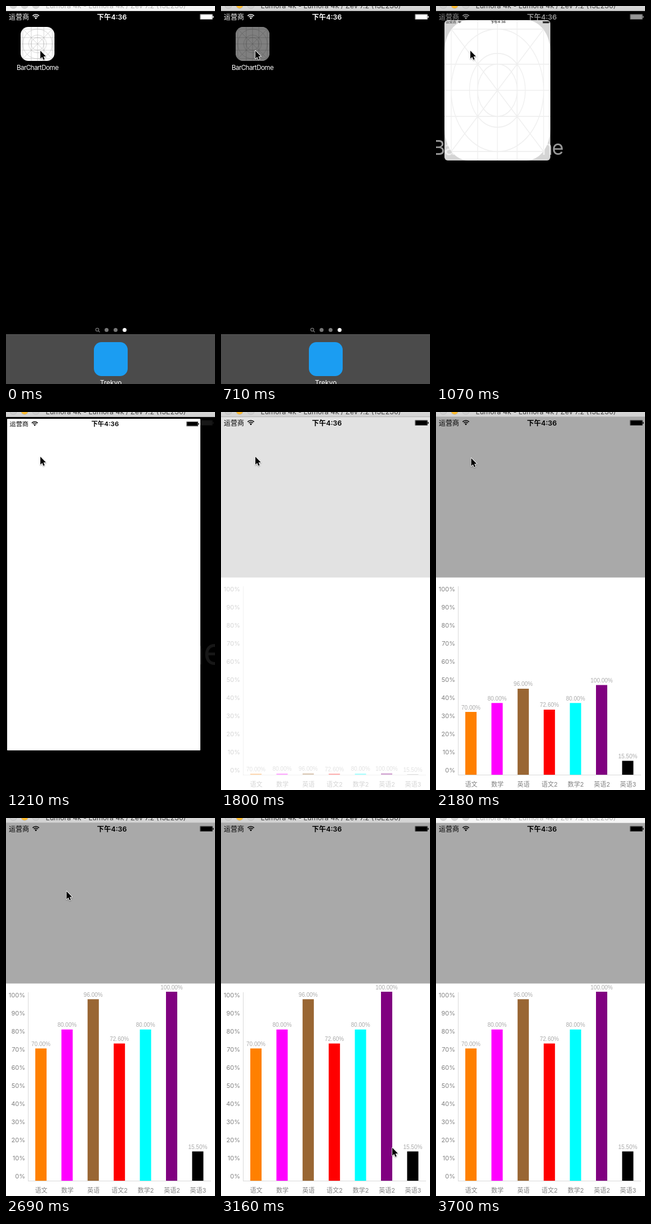
Write an HTML page with a canvas that moves like this. It is 371 px wide and 668 px high and loops after 3730 ms.

```html
<!DOCTYPE html>
<html lang="zh">
<head>
<meta charset="utf-8">
<style>
html, body { margin: 0; width: 371px; height: 668px; overflow: hidden; background: #000; }
canvas { display: block; }
</style>
</head>
<body>
<canvas id="stage" width="371" height="668"></canvas>
<script>
const W = 371, H = 668, LOOP = 3730;
const c = document.getElementById('stage').getContext('2d');
const UI = 'Inter, "Noto Sans CJK SC", "Noto Sans CJK", sans-serif';
const ARIAL = '"Liberation Sans", Arial, sans-serif';

const bars = [
  ['语文', 70, '#ff8000'], ['数学', 80, '#f0f'], ['英语', 96, '#996633'],
  ['语文2', 72.6, '#f00'], ['数学2', 80, '#0ff'], ['英语2', 100, '#800080'],
  ['英语3', 15.5, '#000']
];
const ticks = [0, 600, 710, 950, 1010, 1070, 1160, 1210, 1300, 1390, 1480,
  1800, 1850, 1930, 2010, 2100, 2180, 2230, 2290,
  2350, 2400, 2450, 2500, 2550, 2600, 2650, 2690, 2750, 2800, 2860];
for (let i = 0; i < 18; i++) ticks.push(2890 + i * 490 / 17);
ticks.push(3700);

// Pointer path: time, x, y
const path = [[2100, 61, 79], [2180, 62.5, 81.5], [2350, 62.5, 82],
  [2690, 107.5, 129.5], [2860, 244, 473], [3380, 352, 670]];

const clamp = v => Math.max(0, Math.min(1, v));
const smooth = v => { v = clamp(v); return v * v * (3 - 2 * v); };

function text(s, x, y, font, color, align = 'center', spacing = 0) {
  c.font = font;
  c.fillStyle = color;
  c.textAlign = align;
  c.letterSpacing = spacing + 'px';
  c.fillText(s, x, y);
}

function rect(x, y, w, h, color, r = 0) {
  c.fillStyle = color;
  c.beginPath();
  c.roundRect(x, y, w, h, r);
  c.fill();
}

function disc(x, y, r, color) {
  c.fillStyle = color;
  c.beginPath();
  c.arc(x, y, r, 0, 7);
  c.fill();
}

function layer(alpha, draw) {
  c.save();
  c.globalAlpha *= alpha;
  draw();
  c.restore();
}

function statusBar(color) {
  text('运营商', 5, 23.5, '12px ' + UI, color, 'left');
  text('下午4:36', 188, 23.5, '600 12.4px ' + UI, color);
  c.strokeStyle = color;
  c.lineWidth = 1.7;
  for (const r of [8, 5]) {
    c.beginPath();
    c.arc(53, 23, r, -2.36, -0.78);
    c.stroke();
  }
  c.fillStyle = color;
  c.beginPath();
  c.moveTo(53, 23.5);
  c.arc(53, 23, 2.8, -2.36, -0.78);
  c.fill();
  c.lineWidth = 0.6;
  c.strokeRect(344.8, 14.8, 21.6, 8.8);
  rect(345.3, 15.3, 20.6, 7.8, color, 0.5);
  rect(367, 17.5, 1.5, 3.5, color, 0.7);
}

function line(x1, y1, x2, y2) {
  c.moveTo(x1, y1);
  c.lineTo(x2, y2);
}

// Template icon in a 60 x 60 box
function icon(shade) {
  c.save();
  rect(0, 0, 60, 60, '#fff', 13.5);
  c.clip();
  c.strokeStyle = '#a0a0a0';
  c.lineWidth = 0.42;
  c.beginPath();
  for (const f of [0.064, 0.314, 0.5, 0.686, 0.936]) {
    line(f * 60, 0, f * 60, 60);
    line(0, f * 60, 60, f * 60);
  }
  line(0, 0, 60, 60);
  line(60, 0, 0, 60);
  for (const r of [26.2, 15.8, 11.2]) {
    c.moveTo(30 + r, 30);
    c.arc(30, 30, r, 0, 7);
  }
  c.stroke();
  c.restore();
  if (shade) rect(0, 0, 60, 60, `rgba(0,0,0,${shade})`, 13.5);
}

function homeItems() {
  text('BarChartDome', 56, 113, '11.5px ' + UI, '#fff', 'center', -0.5);
  c.strokeStyle = '#777';
  c.lineWidth = 1.2;
  c.beginPath();
  c.arc(162, 572, 2.7, 0, 7);
  line(164, 574, 166.5, 576.5);
  c.stroke();
  disc(178.5, 572.5, 3.5, '#777');
  disc(194.5, 572.5, 3.5, '#777');
  disc(210.5, 572.5, 3.5, '#fff');
  rect(0, 580, W, 88, '#4b4b4b');
  rect(0, 580, W, 1, '#565656');
  rect(156, 594, 60, 60, '#1b9df2', 13.5);
  text('Trekvo', 186, 670, '12px ' + UI, '#fff');
}

function home(t) {
  const p = smooth((t - 905) / 374.6);
  const width = 60 + 311 * p;
  // Whole pixels keep the window edges sharp
  const [x, y, w, h] = [26 * (1 - p), 37 - 28 * p, width, width * (1 + 0.779 * p)].map(Math.round);
  const s = w / 60;
  layer(1 - p, () => {
    c.translate(x, y);
    c.scale(s, s);
    c.translate(-26, -37);
    homeItems();
  });
  layer(1 - p, () => statusBar('#fff'));
  layer(1, () => {
    c.translate(x, y);
    c.scale(s, h / 60);
    icon(t < 710 ? 0 : 0.5 * clamp(1 - p * 4));
  });
  layer(clamp(2.03 * p), () => {
    c.beginPath();
    c.roundRect(x, y, w, h, 10 * (1 - p));
    c.clip();
    c.translate(x, y);
    c.scale(w / W, h / 660);
    c.translate(0, -9);
    rect(0, 9, W, 660, '#fff');
    statusBar('#000');
  });
}

function chart(t) {
  const grow = smooth((t - 1755) / 880);
  for (let i = 0; i <= 10; i++)
    text(i * 10 + '%', 34, 637 - i * 32, '11px ' + UI, '#808080', 'right');
  rect(39, 308, 1, 334, '#d9d9d9');
  rect(39, 641, 325, 1, '#d9d9d9');
  bars.forEach(([name, value, color], i) => {
    const x = 52 + 46.4 * i, h = 3.34 * value * grow;
    rect(x, 641 - h, 20, h, color);
    text(value.toFixed(2) + '%', x + 10, 636.5 - h, '10px ' + ARIAL, '#aaa');
    text(name, x + 10.5, 662, '11px ' + UI, '#808080');
  });
}

function app(t) {
  rect(0, 9, W, 659, '#fff');
  if (t >= 1800) {
    layer(clamp(0.34 + (t - 1800) / 300), () => {
      rect(0, 9, W, 283.5, 'rgba(0,0,0,0.337)');
      chart(t);
    });
  }
  statusBar('#000');
}

function titleBar(active) {
  const g = c.createLinearGradient(0, 0, 0, 9);
  g.addColorStop(0, active ? '#d8d8d8' : '#f6f6f6');
  g.addColorStop(1, active ? '#d0d0d0' : '#f4f4f4');
  rect(0, 0, W, 9, g);
  rect(0, 8, W, 1, active ? '#b4b4b4' : '#dedede');
  [13, 33, 53].forEach((x, i) => {
    disc(x, -1.5, 6.5, active ? '#bcbcbc' : '#cacaca');
    disc(x, -1.5, 5.8, !active ? '#d4d4d4' : i === 1 ? '#fdbc30' : '#cecece');
  });
  text('Lumora 4k - Lumora 4k / Zev 7.2 (13E230)', 195, 3.5, '12.5px ' + UI,
    active ? '#404040' : '#b0b0b0');
}

function pointerAt(t) {
  let a = path[0];
  for (const b of path) {
    if (t < b[0]) {
      const f = b === a ? 0 : (t - a[0]) / (b[0] - a[0]);
      return [a[1] + (b[1] - a[1]) * f, a[2] + (b[2] - a[2]) * f];
    }
    a = b;
  }
  return [a[1], a[2]];
}

function pointer(t) {
  const [x, y] = pointerAt(t);
  layer(1, () => {
    c.translate(x, y);
    c.beginPath();
    c.moveTo(0, 0);
    for (const [px, py] of [[0, 14], [3.2, 11], [5.4, 16], [7.6, 15], [5.5, 10.3], [9.8, 10]])
      c.lineTo(px, py);
    c.closePath();
    c.shadowColor = 'rgba(0,0,0,0.35)';
    c.shadowBlur = 2;
    c.shadowOffsetY = 1;
    c.strokeStyle = '#fff';
    c.lineWidth = 1.8;
    c.lineJoin = 'round';
    c.stroke();
    c.shadowColor = 'transparent';
    c.fillStyle = '#000';
    c.fill();
  });
}

function draw(time) {
  const t = ticks.findLast(k => k <= time);
  rect(0, 0, W, H, '#000');
  if (t < 1390) home(t); else app(t);
  titleBar(t >= 600 && t < 3700);
  pointer(t);
}

let start;
function frame(now) {
  start ??= now;
  draw((now - start) % LOOP);
  requestAnimationFrame(frame);
}
requestAnimationFrame(frame);
</script>
</body>
</html>
```
